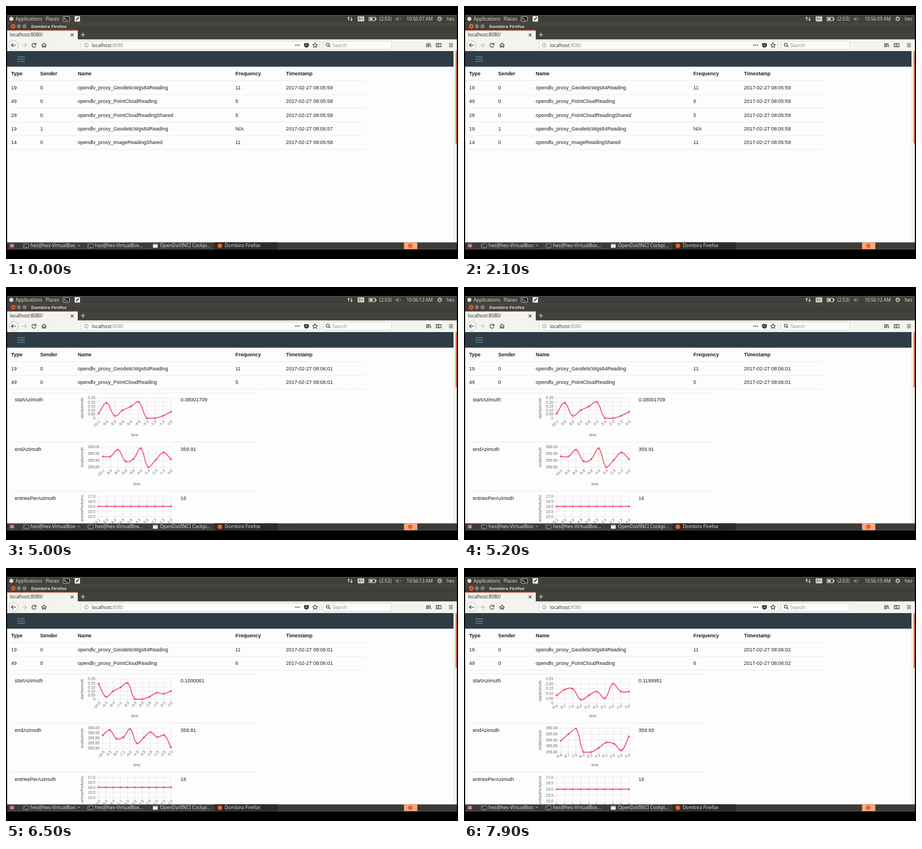
Animation of 800 by 449 pixels, one loop 8 s. Source, as an HTML page:

```html
<!DOCTYPE html>
<html lang="en">
<head>
<meta charset="utf-8">
<title>Signal viewer</title>
<style>
  html, body { margin: 0; width: 100%; height: 100%; overflow: hidden; background: #000; }
  svg { display: block; width: 100%; height: 100%; }
  text { white-space: pre; }
  .ui { font: 8.2px "Noto Sans", "Open Sans", sans-serif; fill: #dfdbd2; }
  .ui .dark { fill: #2c2c2c; }
  .ui .pale { fill: #8c8c8c; }
  .tasks { font-size: 8.4px; }
  .page { font: 8.95px "Liberation Sans", Arial, sans-serif; fill: #1e1e22; }
  .head { font-weight: bold; }
  .chart { font-size: 6.7px; fill: #666; }
  .rule { stroke: #dedeee; stroke-width: .9; stroke-dasharray: 2 1; }
  .grid { stroke: #dcdce8; stroke-width: .8; stroke-dasharray: 2 .8; fill: none; }
  .curve { stroke: #f0566e; stroke-width: 1.7; fill: none; }
  .dot { fill: #f0566e; }
  .line { fill: none; stroke: #3a3a3a; stroke-width: 1.1; }
  .lite { fill: none; stroke: #dfdbd2; stroke-width: 1.1; }
</style>
</head>
<body>
<svg viewBox="0 0 800 449" preserveAspectRatio="none">
  <defs>
    <linearGradient id="bar" x2="0" y2="1">
      <stop offset="0" stop-color="#48473f"/><stop offset="1" stop-color="#3c3b37"/>
    </linearGradient>
    <clipPath id="view"><rect x="2" y="108" width="790" height="311.5"/></clipPath>
    <clipPath id="plot3"><rect x="129" y="369" width="170" height="60"/></clipPath>
  </defs>
  <rect width="800" height="449"/>
  <rect x="2" y="16.5" width="796" height="415" fill="#fdfdfd"/>

  <g class="page" clip-path="url(#view)" id="page"></g>

  <g class="ui">
    <!-- desktop panel and title bar -->
    <rect x="2" y="16.5" width="796" height="12.5" fill="#403f3a"/>
    <rect x="2" y="29" width="796" height="14" fill="url(#bar)"/>
    <circle cx="9.5" cy="22.8" r="3.6" fill="#dfdbd2"/>
    <text x="17" y="25.8">Applications</text>
    <text x="70" y="25.8">Places</text>
    <g id="term"><rect x="101" y="18.8" width="11.5" height="8.4" rx="1" fill="#24232a" stroke="#c8c6c0" stroke-width="1"/>
      <path d="M103 21l2 1.5l-2 1.5M106 24.8h3" class="lite" stroke-width=".8"/></g>
    <rect x="121.5" y="18" width="9.5" height="9.6" fill="#f2f2ee"/>
    <path d="M124 25l5-5" stroke="#44443e" stroke-width="2"/>
    <path d="M606.5 26v-6m-1.8 2l1.8-2.3l1.8 2.3M611.5 19.5v6m-1.8-2l1.8 2.3l1.8-2.3" class="lite"/>
    <rect x="622.5" y="18.5" width="11.5" height="8.8" rx="1" fill="#dfdbd2"/>
    <text x="624" y="25.4" class="dark" style="font-size:7px">En</text>
    <rect x="642.5" y="20" width="11" height="6" class="lite"/>
    <path d="M644 21.3h5v3.5h-5zM654 21.5h1.6v3h-1.6z" fill="#dfdbd2"/>
    <text x="661" y="25.8">(2:53)</text>
    <path d="M690 21.5h2l2.5-2v7l-2.5-2h-2zM696.5 21l3.5 3.5m0-3.5l-3.5 3.5" fill="#7c7b75" stroke="#7c7b75" stroke-width=".8"/>
    <text id="clock" x="709" y="25.8" style="font-size:8px"></text>
    <circle cx="767.7" cy="22.8" r="2.4" class="lite"/>
    <circle cx="767.7" cy="22.8" r="3.8" class="lite" stroke-dasharray="1.5 1.48"/>
    <text x="780" y="25.8">hes</text>
    <circle cx="12.8" cy="36" r="3.9" fill="#e8623a"/>
    <path d="M11.3 34.5l3 3m0-3l-3 3" stroke="#4a2010" stroke-width="1"/>
    <circle cx="22.8" cy="36" r="3.7" fill="#7b7a74"/>
    <circle cx="32.8" cy="36" r="3.7" fill="#7b7a74"/>
    <text x="44.5" y="38.8" font-weight="bold" style="font-size:7.8px">Dombira Firefox</text>

    <!-- tabs and toolbar -->
    <rect x="2" y="43" width="796" height="16.5" fill="#42413c"/>
    <rect x="2" y="43" width="125" height="17" fill="#f4f4ef"/>
    <rect x="2" y="42.6" width="125" height="1.2" fill="#d0604a"/>
    <rect x="2" y="59.5" width="796" height="20.5" fill="#f4f4ef"/>
    <text x="7" y="54.3" class="dark">localhost:8080/</text>
    <path d="M114.5 48.8l5 5m0-5l-5 5" class="line"/>
    <path d="M132.5 51h7.5m-3.75-3.75v7.5" class="lite"/>
    <circle cx="13.5" cy="69.5" r="8" fill="#fdfdfd" stroke="#aaaaa6" stroke-width=".8"/>
    <path d="M18 69.5h-8.5m3.5-3.5l-3.5 3.5l3.5 3.5" class="line"/>
    <path d="M28 69.5h8m-3.5-3.5l3.5 3.5l-3.5 3.5" class="line" style="stroke:#c0c0bc"/>
    <path d="M52.5 68a3.5 3.5 0 1 0 .3 2.6M53 65.5v3h-3" class="line"/>
    <path d="M63 69.8l4.3-4l4.3 4M64.3 69v4h2v-2.5h2v2.5h2v-4" class="line"/>
    <g fill="#fdfdfd" stroke="#d2d2ce" stroke-width=".9">
      <rect x="133" y="62.3" width="422" height="14.4" rx="1.5"/>
      <rect x="561.5" y="62.3" width="121" height="14.4" rx="1.5"/>
    </g>
    <circle cx="142" cy="69.5" r="3.6" class="line" style="stroke:#808080;stroke-width:.8"/>
    <path d="M142 68.8v2.6M142 66.9v1" stroke="#808080" stroke-width="1"/>
    <text x="152" y="72.5" class="dark">localhost<tspan class="pale">:8080</tspan></text>
    <g fill="#3a3a3a">
      <circle cx="513" cy="69.5" r="1.1"/><circle cx="516.2" cy="69.5" r="1.1"/><circle cx="519.4" cy="69.5" r="1.1"/>
      <path d="M527.5 66h8.6v3.5a4.3 4.3 0 0 1-8.6 0z"/>
    </g>
    <path d="M530 68.6l1.8 1.8l1.8-1.8" stroke="#fdfdfd" fill="none"/>
    <path d="M547 65.3l1.2 2.8l3 .3l-2.3 2l.7 3l-2.6-1.6l-2.6 1.6l.7-3l-2.3-2l3-.3z" class="line" stroke-width=".9"/>
    <circle cx="569.5" cy="68.5" r="2.7" class="line"/>
    <path d="M571.5 70.5l2.7 2.7" class="line"/>
    <text x="578" y="72.5" class="pale">Search</text>
    <path d="M744.5 66v7m2-7v7m2-7v7m1.5-7l2.2 7M761.5 66.5h8.5v6h-8.5zm4.5 0v6m-2.8-4.3h1.4m-1.4 2h1.4M784 66.8h7m-7 2.7h7m-7 2.7h7" class="line"/>

    <!-- page bar and scrollbar -->
    <rect x="2" y="80" width="790" height="27.7" fill="#2e3c46"/>
    <path d="M20 90.2h13.5m-13.5 4h13.5m-13.5 4h13.5" stroke="#6f9ea8" stroke-width="1.1"/>
    <rect x="792" y="80" width="6" height="339.5" fill="#f0f0ec"/>
    <rect id="thumb" x="795.6" y="80" width="2.4" fill="#ee7850"/>

    <!-- task bar -->
    <g class="tasks">
      <rect x="2" y="419.5" width="796" height="12" fill="#3c3b37"/>
      <rect x="369" y="419.5" width="112" height="12" fill="#2c2b28"/>
      <rect x="704.5" y="419.5" width="23.5" height="12" fill="#f8a880"/>
      <circle cx="715.5" cy="425.5" r="4" fill="#e8622c"/>
      <rect x="6.5" y="421.8" width="8" height="7" fill="#a04c98"/>
      <path d="M8 424h5m-5 2.5h5" stroke="#ecdcec" stroke-width="1"/>
      <use href="#term" transform="translate(-50 407.3) scale(.8)"/>
      <text x="43.5" y="428.3">hes@hes-VirtualBox: ~</text>
      <use href="#term" transform="translate(64 407.3) scale(.8)"/>
      <text x="157.5" y="428.3">hes@hes-VirtualBox…</text>
      <rect x="260" y="422" width="8.5" height="7" fill="#f0f0f4"/>
      <path d="M260 423h8.5" stroke="#7c9cd0" stroke-width="1.5"/>
      <text x="272.5" y="428.3">OpenDaVINCI Cockpi…</text>
      <circle cx="378.5" cy="425.5" r="4" fill="#e8622c"/>
      <text x="387" y="428.3">Dombira Firefox</text>
    </g>
  </g>
</svg>
<script>
const LOOP = 8000;
const $ = id => document.getElementById(id);

const startB = [.06, .19, .03, .1, .145, .2, .002, .002, .03, .08];
const endB = [.93, .93, .98, .895, .91, .99, .85, .905, .96, .91];

// Each state holds until the next one; end values are offsets above 359.
const states = [
  { at: 0, stamp: '05:58', late: '05:57', freq: 5 },
  { at: 1500, stamp: '05:59', late: '05:58', freq: 6 },
  { at: 3000, stamp: '06:00', freq: 6, width: 423, top: .2, low: .8, tilt: 50, now: ['0.1199951', '359.835'],
    ages: [-10.8, -9.5, -8.5, -7.4, -6.3, -5.3, -3.9, -2.8, -1.8, -.7, 0],
    start: [.015, .032, .12, .13, .17, .1, .11, .187, .05, .1, .12],
    end: [.92, .88, .87, .835, .995, .845, .96, .958, .99, .99, .835] },
  { at: 4400, stamp: '06:01', freq: 5, width: 444, top: .25, low: .85, tilt: 42, now: ['0.08001709', '359.91'],
    ages: [-10.1, -9, -8, -6.9, -5.8, -4.5, -3.4, -2.3, -1.3, 0],
    start: startB, end: endB },
  { at: 5400, stamp: '06:01', freq: 5, width: 432, top: .25, low: .85, tilt: 20, now: ['0.2000122', '359.87'],
    ages: [-9.9, -8.8, -7.8, -6.5, -5.3, -4.3, -3.2, -2.1, -.8, 0],
    start: [...startB.slice(1), .2], end: [...endB.slice(1), .87] },
  { at: 6100, stamp: '06:01', freq: 6, width: 446, top: .25, low: .8, tilt: 50, now: ['0.1000061', '359.81'],
    ages: [-10.5, -9.5, -8.4, -7.1, -6, -4.9, -3.8, -2.8, -1.5, -.5, 0],
    start: [...startB.slice(1), .068, .1], end: [...endB.slice(1), .93, .81] },
  { at: 7200, stamp: '06:02', freq: 6, width: 428, top: .25, low: .8, tilt: 20, now: ['0.1199951', '359.93'],
    ages: [-9.9, -8.7, -7.5, -6.4, -5.3, -4.3, -3.1, -2, -1, 0],
    start: [.08, .14, .148, .035, .08, .12, .05, .2, .12, .12],
    end: [.895, .95, .995, .8, .8, .835, .88, .87, .815, .93] },
];

const text = (x, y, s, attrs = '') => `<text x="${x}" y="${y}" ${attrs}>${s}</text>`;
const rule = (y, right) => `<path class="rule" d="M9 ${y}H${right}"/>`;
const cells = (y, row, attrs) =>
  row.map((s, i) => text([9, 60.5, 127, 406, 495.5][i], y, s, attrs)).join('');

// Smooth line with tension 0.4; handles stay inside the plot area.
function smooth(pts, top, bottom) {
  const cap = y => Math.min(bottom, Math.max(top, y));
  const handles = pts.map((p, i) => {
    const a = pts[i - 1] || p, b = pts[i + 1] || p;
    const da = Math.hypot(p[0] - a[0], p[1] - a[1]);
    const db = Math.hypot(b[0] - p[0], b[1] - p[1]);
    const ka = .4 * da / (da + db), kb = .4 * db / (da + db);
    const dx = b[0] - a[0], dy = b[1] - a[1];
    return { in: [p[0] - ka * dx, cap(p[1] - ka * dy)], out: [p[0] + kb * dx, cap(p[1] + kb * dy)] };
  });
  return 'M' + pts[0] + pts.slice(1).map((p, i) => `C${handles[i].out} ${handles[i + 1].in} ${p}`).join('');
}

function chart({ name, left, top, height, min, max, step, digits, values, ages, tilt, clip }) {
  const bottom = top + height, right = 292;
  const px = i => left + (right - left) * i / (ages.length - 1);
  const py = v => bottom - height * (v - min) / (max - min);
  const mid = (top + bottom) / 2;
  let out = '', grid = '';
  const rows = Math.round((max - min) / step);
  for (let i = 0; i <= rows; i++) {
    const v = min + i * step, y = py(v);
    grid += `M${left - 5} ${y}H${right}`;
    out += text(left - 6, y + 2.3, v ? v.toFixed(digits) : '0', 'text-anchor="end"');
  }
  ages.forEach((age, i) => {
    const x = px(i);
    grid += `M${x} ${top}V${bottom + 4}`;
    out += text(0, 2, age.toFixed(1),
      `text-anchor="end" transform="translate(${x + 2} ${bottom + 5}) rotate(${-tilt})"`);
  });
  const pts = values.map((v, i) => [px(i), py(v)]);
  out += text(0, 2, name, `text-anchor="middle" transform="translate(135 ${mid}) rotate(-90)"`);
  out += text((left + right) / 2, top + 68, 'time', 'text-anchor="middle"');
  return `<g class="chart" ${clip || ''}><path class="grid" d="${grid}"/>${out}
    <path class="curve" d="${smooth(pts, top, bottom)}"/>
    ${pts.map(p => `<circle class="dot" cx="${p[0]}" cy="${p[1]}" r="1.8"/>`).join('')}</g>`;
}

function details(s) {
  const { ages, tilt } = s;
  const names = ['startAzimuth', 'endAzimuth', 'entriesPerAzimuth'];
  const height = tilt < 30 ? 42.8 : 36;
  const base = { ages, tilt, height, left: 164 };
  let out = [188, 275.3, 362.3].map(y => rule(y, s.width)).join('');
  names.forEach((n, i) => {
    const y = 203.4 + i * 87.2;
    out += text(15.5, y, n) + text(309, y, [...s.now, '16'][i]);
  });
  return out +
    chart({ ...base, name: names[0], top: 197, min: 0, max: s.top, step: .05, digits: 2, values: s.start }) +
    chart({ ...base, name: names[1], top: 284, left: 171.5, min: 359 + s.low, max: 360, step: .05, digits: 2,
      values: s.end.map(v => 359 + v) }) +
    chart({ ...base, name: names[2], top: 371.3, min: 15, max: 17, step: .5, digits: 1,
      values: ages.map(() => 16), clip: 'clip-path="url(#plot3)"' });
}

function page(s) {
  const day = '2017-02-27 08:';
  const rows = [
    [19, 0, 'GeodeticWgs84Reading', 11],
    [49, 0, 'PointCloudReading', s.freq],
    [28, 0, 'PointCloudReadingShared', 5],
    [19, 1, 'GeodeticWgs84Reading', 'N/A'],
    [14, 0, 'ImageReadingShared', 11],
  ].slice(0, s.ages ? 2 : 5);
  let out = cells(123.2, ['Type', 'Sender', 'Name', 'Frequency', 'Timestamp'], 'class="head"') + rule(132.5, 635.5);
  rows.forEach(([type, sender, name, freq], i) => {
    const y = 147.8 + i * 24.4;
    out += cells(y, [type, sender, 'opendlv_proxy_' + name, freq, day + (sender ? s.late : s.stamp)]);
    out += rule(y + 9.2, 635.5);
  });
  return out + (s.ages ? details(s) : '');
}

let shown;
function draw(t) {
  const state = states.findLast(s => s.at <= t);
  $('clock').textContent = `10:56:${String(Math.floor(7.4 + t / 1000)).padStart(2, '0')} AM`;
  if (state === shown) return;
  shown = state;
  $('page').innerHTML = page(state);
  $('thumb').setAttribute('height', state.ages ? 98 : 164);
}

const begin = performance.now();
function frame() {
  draw((performance.now() - begin) % LOOP);
  requestAnimationFrame(frame);
}
frame();
</script>
</body>
</html>
```
